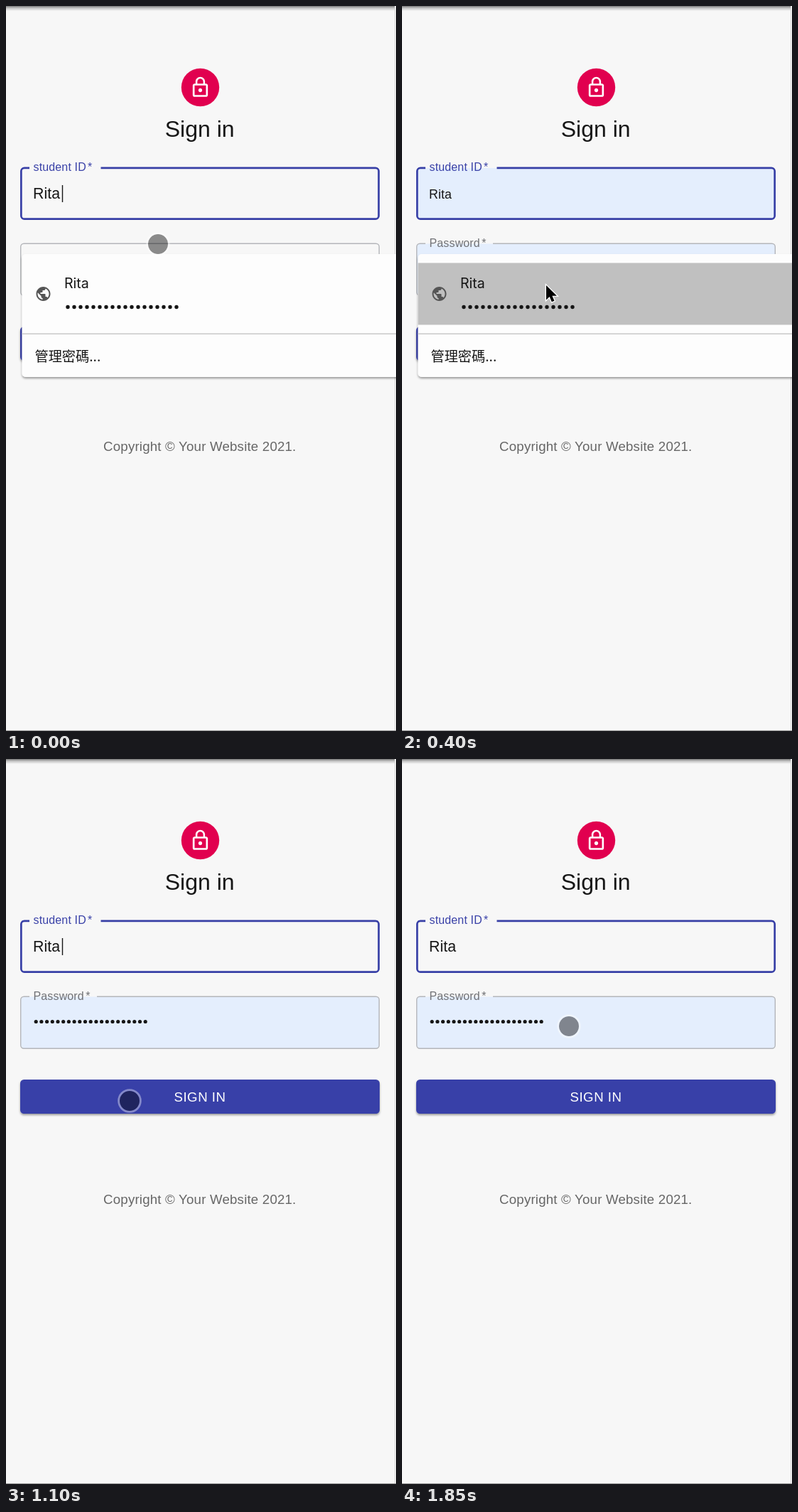
These frames come from a looping animation (549 by 1020 pixels, 1.9 s). An HTML page:

```html
<!DOCTYPE html>
<html lang="en">
<head>
<meta charset="utf-8">
<title>Sign in</title>
<style>
html, body { margin: 0; width: 100%; height: 100%; overflow: hidden; background: #f7f7f7; }
svg { display: block; width: 100%; height: 100%; }
text { font-family: "Liberation Sans", Arial, sans-serif; fill: #161616; }
.label { font-size: 21.33px; letter-spacing: .2px; }
.value { font-size: 21.33px; letter-spacing: .1px; }
.menu { font-family: Inter, sans-serif; font-size: 19.6px; }
.cjk { font-family: "Noto Sans CJK TC", "Noto Sans CJK", sans-serif; font-size: 19.2px; }
.dots { fill: none; stroke: #161616; stroke-linecap: round; }
.mid { text-anchor: middle; }
</style>
</head>
<body>
<svg viewBox="0 0 549 1020">
  <defs>
    <linearGradient id="bar" x2="0" y2="1">
      <stop offset="0" stop-opacity=".52"/>
      <stop offset=".4" stop-opacity=".22"/>
      <stop offset="1" stop-opacity="0"/>
    </linearGradient>
    <filter id="drop" x="-10%" y="-20%" width="120%" height="150%">
      <feDropShadow dx="0" dy="2" stdDeviation="1.8" flood-opacity=".38"/>
    </filter>
  </defs>

  <rect width="549" height="1020" fill="#f7f7f7"/>
  <rect width="547" height="7" fill="url(#bar)"/>
  <path d="M547.5 0V1020" stroke="#d9d9d9"/>
  <path d="M0 1019.5H549" stroke="#9b9b9b"/>

  <circle cx="273.5" cy="114.5" r="26.7" fill="#e1004f"/>
  <path transform="translate(257.5 98.5) scale(1.333)" fill="#fff" d="M12 17c1.1 0 2-.9 2-2s-.9-2-2-2-2 .9-2 2 .9 2 2 2zm6-9h-1V6c0-2.76-2.24-5-5-5S7 3.24 7 6v2H6c-1.1 0-2 .9-2 2v10c0 1.1.9 2 2 2h12c1.1 0 2-.9 2-2V10c0-1.1-.9-2-2-2zM8.9 6c0-1.71 1.39-3.1 3.1-3.1s3.1 1.39 3.1 3.1v2H8.9V6zM18 20H6V10h12v10z"/>
  <text class="mid" x="272.7" y="184" font-size="32">Sign in</text>

  <rect id="idFill" x="21" y="228" width="504" height="72" rx="5" fill="#e4eefd"/>
  <path id="idBox" fill="none" stroke="#373fa6" stroke-width="2.67"/>
  <text class="label" transform="translate(38.5 232) scale(.75)" style="fill:#3a42a8">student ID<tspan dx="3">*</tspan></text>
  <text id="idText" class="value" x="38" y="271">Rita</text>
  <path id="caret" d="M79.5 252V276" stroke="#161616" stroke-width="1.4"/>

  <rect id="pwFill" x="20.5" y="334.5" width="505" height="73" rx="5" fill="#e4eefd"/>
  <path id="pwBox" fill="none" stroke="#b4b6ba" stroke-width="1.4"/>
  <text id="pwLabel" class="label" style="fill:#707175">Password<tspan dx="3">*</tspan></text>
  <path id="pwDots" class="dots" d="M42.2 369.5h154.5" stroke-width="5.2" stroke-dasharray="0 7.7"/>

  <rect x="20" y="451" width="506" height="48" rx="5.3" fill="#3840a8" filter="url(#drop)"/>
  <text class="mid" x="273" y="481.7" font-size="18.67" letter-spacing=".53" style="fill:#fff">SIGN IN</text>
  <text class="mid" x="272.8" y="626" font-size="18.67" letter-spacing=".2" style="fill:#666">Copyright © Your Website 2021.</text>

  <g id="popup">
    <rect x="22.5" y="349" width="560" height="173" rx="5" fill="#fdfdfd" filter="url(#drop)"/>
    <rect id="row" x="22.5" y="361.5" width="527" height="87" fill="#c0c0c0"/>
    <path d="M22.5 461.3H549" stroke="#c9c9c9" stroke-width="1.5"/>
    <path transform="translate(40.5 393)" fill="#555" d="M12 2C6.48 2 2 6.48 2 12s4.48 10 10 10 10-4.48 10-10S17.52 2 12 2zm-1 17.93c-3.95-.49-7-3.85-7-7.93 0-.62.08-1.21.21-1.79L9 15v1c0 1.1.9 2 2 2v1.93zm6.9-2.54c-.26-.81-1-1.39-1.9-1.39h-1v-3c0-.55-.45-1-1-1H8v-2h2c.55 0 1-.45 1-1V7h2c1.1 0 2-.9 2-2v-.41c2.93 1.19 5 4.06 5 7.41 0 2.08-.8 3.97-2.1 5.39z"/>
    <text class="menu" x="82" y="396.5">Rita</text>
    <path class="dots" d="M87 423.5h153.3" stroke-width="5.4" stroke-dasharray="0 9"/>
    <text class="cjk" x="40.5" y="499.5">管理密碼...</text>
  </g>

  <g id="touch">
    <circle r="14" fill-opacity=".44"/>
    <circle r="15.4" fill="none" stroke="#fff" stroke-opacity=".38" stroke-width="2.8"/>
  </g>
  <path id="arrow" d="M0 0V20.5l4.7-4.4 3.1 7.2 3.7-1.6-3.1-7h6.5z" stroke="#fff" stroke-width="2.6" paint-order="stroke"/>
</svg>
<script>
const LOOP = 1900, STEP = 50;
const HOVER = 120, ARROW = 200, PICK = 500;
const $ = id => document.getElementById(id);
const show = (id, on) => $(id).setAttribute('visibility', on ? 'visible' : 'hidden');
const move = (id, x, y, s = 1) => $(id).setAttribute('transform', `translate(${x} ${y}) scale(${s})`);
const clamp = v => Math.min(1, Math.max(0, v));
const mix = (a, b, k) => a + (b - a) * k;

// time, x, y of the pointer
const path = [
  [0, 214, 335], [150, 204, 382], [200, 203, 393], [500, 203, 393],
  [600, 198, 414], [750, 180, 449], [900, 174, 478], [1000, 174, 481],
  [1300, 174, 481], [1550, 177, 481], [1650, 187, 463], [1850, 235, 376]
];

function pointer(t) {
  const i = Math.max(1, path.findIndex(p => p[0] >= t));
  const [t0, x0, y0] = path[i - 1], [t1, x1, y1] = path[i];
  const k = clamp((t - t0) / (t1 - t0));
  return [mix(x0, x1, k), mix(y0, y1, k)];
}

// cubic-bezier(0, 0, .2, 1)
function easeOut(x) {
  let lo = 0, hi = 1;
  for (let i = 0; i < 24; i++) {
    const u = (lo + hi) / 2;
    if (.6 * u * u * (1 - u) + u ** 3 < x) lo = u; else hi = u;
  }
  return 3 * lo * lo * (1 - lo) + lo ** 3;
}

// rounded outline with a gap in its top edge for the label
function outline(id, y, w, gap) {
  const l = 20 + w / 2, r = 526 - w / 2, top = y + w / 2, bottom = y + 74.5 - w / 2, c = 4.5;
  $(id).setAttribute('d', `M${33 + gap} ${top}H${r - c}a${c} ${c} 0 0 1 ${c} ${c}V${bottom - c}` +
    `a${c} ${c} 0 0 1 ${-c} ${c}H${l + c}a${c} ${c} 0 0 1 ${-c} ${-c}V${top + c}` +
    `a${c} ${c} 0 0 1 ${c} ${-c}H33`);
}

function draw(t) {
  const open = t < PICK, hover = t >= HOVER, preview = open && hover;
  const k = easeOut(clamp((t - HOVER) / 200));

  show('popup', open);
  show('row', preview);
  show('idFill', preview);
  show('pwFill', hover);
  show('pwDots', hover);
  show('caret', !preview && (t < 400 || t >= 900 && t < 1400));

  $('idText').style.fontSize = preview ? '17.8px' : '';
  move('pwLabel', 38.5, mix(378, 338.5, k), mix(1, .75, k));
  outline('pwBox', 333.5, 1.4, 95 * easeOut(clamp((t - HOVER - 50) / 100)));

  const arrow = open && t >= ARROW, [x, y] = pointer(t);
  show('arrow', arrow);
  show('touch', !arrow);
  move('arrow', x, y);
  move('touch', x, y);
}

function tick() {
  const t = (performance.now() - start) % LOOP;
  draw(Math.floor(t / STEP) * STEP);
  requestAnimationFrame(tick);
}

outline('idBox', 226.5, 2.67, 100.5);
const start = performance.now();
tick();
</script>
</body>
</html>
```
